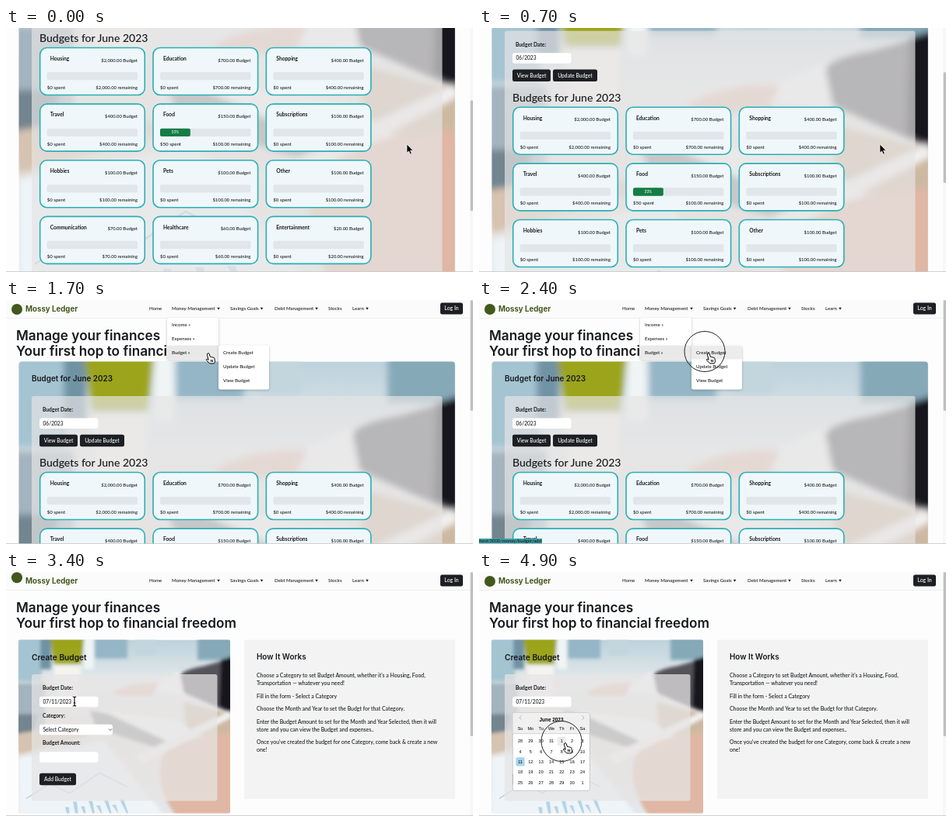
Write an HTML page that moves like this. It is 600 by 315 pixels and loops after 5 s.

```html
<!DOCTYPE html>
<html lang="en">
<head>
<meta charset="utf-8">
<title>Budget planner</title>
<style>
html, body { margin: 0; width: 100%; height: 100%; overflow: hidden; background: #fdfdfd; }
svg { display: block; width: 600px; height: 315px; }
text { font-family: Lato, "Open Sans", sans-serif; font-weight: 500; fill: #16191c; white-space: pre; }
.head { font-family: Inter, sans-serif; font-weight: 600; }
.brand { font-family: Inter, sans-serif; font-weight: 700; fill: #42581c; }
.bold { font-weight: 700; }
.white { fill: #fff; }
.cal { font-family: "Liberation Sans", Arial, sans-serif; font-weight: 400; fill: #000; }
.calb { font-family: "Liberation Sans", Arial, sans-serif; font-weight: 700; fill: #000; }
.calw { font-family: "Liberation Sans", Arial, sans-serif; font-weight: 700; fill: #fff; }
</style>
</head>
<body>
<svg id="stage" viewBox="0 0 600 315"></svg>
<script>
const DARK = '#1c1f23';

// y is the middle of the capitals
const text = (x, y, s, size = 6.1, cls = '', anchor = 'start') =>
  `<text x="${x}" y="${(y + size * 0.35).toFixed(2)}" font-size="${size}" class="${cls}" text-anchor="${anchor}">${s}</text>`;
const rect = (x, y, w, h, fill, r = 0, more = '') =>
  `<rect x="${x}" y="${y}" width="${w}" height="${h}" fill="${fill}" rx="${r}" ${more}/>`;
const path = (d, fill, more = '') => `<path d="${d}" fill="${fill}" ${more}/>`;
const group = (id, body, more = '') => `<g id="${id}" ${more}>${body}</g>`;
const button = (x, y, w, s) =>
  rect(x, y, w, 15.5, DARK, 2.5) + text(x + w / 2, y + 7.8, s, 6.7, 'white', 'middle');
const field = (x, y, w, s) => rect(x, y, w, 13.5, '#fff', 3) + text(x + 4.5, y + 6.9, s, 6.6);

const defs = `<defs>
  <linearGradient id="air" x2="0" y2="1">
    <stop offset="0" stop-color="#bdd2dc"/><stop offset=".25" stop-color="#e6eaeb"/>
    <stop offset=".6" stop-color="#e4dfda"/><stop offset="1" stop-color="#e3e8ec"/>
  </linearGradient>
  <filter id="soft" x="-10%" y="-10%" width="120%" height="120%"><feGaussianBlur stdDeviation="2"/></filter>
  <filter id="shadow" x="-20%" y="-20%" width="140%" height="140%">
    <feDropShadow dx="0" dy="1" stdDeviation="1.5" flood-opacity=".25"/></filter>
  <clipPath id="crop"><rect width="272" height="224" rx="2"/></clipPath>
  <g id="photo" clip-path="url(#crop)">${
    rect(0, 0, 272, 224, 'url(#air)') +
    `<g filter="url(#soft)">` +
    rect(-6, -6, 36, 60, '#a5c4d2') +
    rect(28, -6, 14, 44, '#6f93a4') +
    rect(98, -6, 42, 30, '#94b6c6') +
    rect(150, -6, 26, 26, '#c3d5dd') +
    rect(230, -6, 50, 32, '#86a9b8') +
    rect(84, -6, 13, 44, '#f0f4f5') +
    rect(-6, 56, 40, 62, '#a4b4be') +
    path('M-6 96H26L18 122H-6Z', '#73858f') +
    path('M40-6H85L80 32H46Z', '#9ca41c') +
    path('M45 32H81L77 84H49Z', '#f4f3f0') +
    path('M280 22L238 34Q214 38 207 46L212 68L280 98Z', '#55535a') +
    path('M280 20L260 26L258 86L280 96Z', '#16181b') +
    path('M207 42L180 54L172 66L213 72Z', '#f2f4f7') +
    path('M122 68Q146 54 180 56L172 72Q150 74 126 72Z', '#e2bfb0') +
    path('M212 80L280 98V126L216 122Z', '#cdb9a2') +
    path('M-6 122L70 110L96 122L0 148Z', '#d6c3b0') +
    path('M0 152L110 130L190 230H0Z', '#eef4f8') +
    path('M92 92L205 108L255 140L215 152L100 114Z', '#85888e') +
    path('M104 90L205 104L240 130L206 138Z', '#f5f5f5') +
    path('M280 120Q220 120 186 148Q172 186 204 230H280Z', '#e0b7a4') +
    path('M150 150L272 92L274 100L160 160Z', '#f2f0ef') +
    `</g>` +
    path('M10 205L40 186L66 198L104 172L140 190', 'none', 'stroke="#8db8d4" stroke-width="1.2" opacity=".7"') +
    Array.from({ length: 8 }, (_, i) =>
      path(`M${62 + i * 11} 224l${-2 - i} ${-8 - (i * 7) % 13}h5l${2 + i} 26z`, '#8fc0da', 'opacity=".6"')).join('')
  }</g>
</defs>`;

const nav = [[184, 'Home'], [213, 'Money Management', 273], [288, 'Savings Goals', 328.5],
  [345, 'Debt Management', 399], [414, 'Stocks'], [445, 'Learn', 464]];

const header = rect(0, 0, 600, 23, '#fbfbfb') + rect(0, 23, 600, 0.6, '#e3e3e3') +
  '<circle id="logo" cx="14" cy="12" r="7" fill="#42581c"/>' +
  text(25, 11.5, 'Mossy Ledger', 9.7, 'brand') +
  nav.map(([x, s, c]) => text(x, 11, s) + (c ? path(`M${c - 1.8} 9.8h3.6l-1.8 3z`, DARK) : '')).join('') +
  rect(558, 3.5, 29, 15, DARK, 2.5) + text(572.5, 11, 'Log In', 6.9, 'white', 'middle') +
  text(13, 46, 'Manage your finances', 17.2, 'head') +
  text(13, 65.5, 'Your first hop to financial freedom', 17.2, 'head');

const budgets = [['Housing', 2000], ['Education', 700], ['Shopping', 400], ['Travel', 400],
  ['Food', 150, 50], ['Subscriptions', 100], ['Hobbies', 100], ['Pets', 100], ['Other', 100],
  ['Communication', 70], ['Healthcare', 60], ['Entertainment', 20]];
const money = n => '$' + n.toLocaleString('en-US', { minimumFractionDigits: 2 });

function card([name, total, spent = 0], i) {
  const x = 43.7 + i % 3 * 145.3, y = 222.5 + Math.floor(i / 3) * 72.6;
  const part = spent / total;
  return rect(x, y, 134.6, 61, '#f0f7fa', 9, 'stroke="#29afb7" stroke-width="1.6"') +
    text(x + 13, y + 14, name, 6.7, 'bold') +
    text(x + 125.3, y + 16, money(total) + ' Budget', 5.9, '', 'end') +
    rect(x + 9, y + 31.5, 116.5, 10.3, '#e1e6ea', 2.5) +
    (spent ? rect(x + 9, y + 31.5, 116.5 * part, 10.3, '#147d45', 2) +
      text(x + 9 + 58 * part, y + 36.7, Math.floor(part * 100) + '%', 4.8, 'white', 'middle') : '') +
    text(x + 9, y + 51.5, `$${spent} spent`, 6.1) +
    text(x + 125.3, y + 51.5, money(total - spent) + ' remaining', 5.9, '', 'end');
}

const overview = '<use href="#photo" transform="translate(16.5 79.5) scale(2.06)"/>' +
  text(33, 101.5, 'Budget for June 2023', 9.9, 'head') +
  rect(33, 124, 527.5, 410, '#e6e5e5', 3, 'opacity=".68"') +
  text(47, 141.5, 'Budget Date:', 6.7, 'bold') +
  field(43, 152.5, 75.5, '06/2023') +
  button(43, 173.7, 49, 'View Budget') + button(95, 173.7, 57, 'Update Budget') +
  text(43, 210.5, 'Budgets for June 2023', 14) +
  budgets.map(card).join('');

const help = [[134, "Choose a Category to set Budget Amount, whether it's a Housing, Food,"],
  [144, 'Transportation — whatever you need!'], [160.5, 'Fill in the form - Select a Category'],
  [177, 'Choose the Month and Year to set the Budgt for that Category.'],
  [193.5, 'Enter the Budget Amount to set for the Month and Year Selected, then it will'],
  [203.5, 'store and you can view the Budget and expenses..'],
  [219.5, "Once you've created the budget for one Category, come back &amp; create a new"], [229.5, 'one!']];

const form = '<use href="#photo" transform="translate(16 87.5)"/>' +
  text(33, 110, 'Create Budget', 10.2, 'head') +
  rect(33, 132, 238.5, 163.5, '#e6e5e5', 3, 'opacity=".72"') +
  text(47, 149.5, 'Budget Date:', 6.7, 'bold') + field(43, 160.7, 75.5, '07/11/2023') +
  rect(43, 160.7, 75.5, 13.5, 'none', 3, 'id="focus" stroke="#2a7fd0" stroke-width="1.5"') +
  text(47, 186, 'Category:', 6.7, 'bold') + field(43, 196.7, 94, 'Select Category') +
  path('M132 202.5l2 2l2-2', 'none', `stroke="${DARK}" stroke-width=".7"`) +
  text(47, 221, 'Budget Amount:', 6.7, 'bold') + field(43, 232.3, 75.5, '') +
  button(43, 259.7, 47, 'Add Budget') +
  rect(306, 87.5, 271, 205.5, '#f3f3f3', 2) +
  text(322, 110, 'How It Works', 9.9, 'head') +
  help.map(([y, s]) => text(322, y, s, 6.9)).join('');

// Month grid; first is the day of the month in the top left cell
function month(id, title, first, prevLen, len, rows, pick, pickFill, pickCls, hover) {
  const col = i => 53 + i % 7 * 13.33, row = i => 218.3 + Math.floor(i / 7) * 13.33;
  const lead = prevLen - first + 1;
  const cell = (i, fill) => rect(col(i) - 5.6, row(i) - 5.6, 11.2, 11.2, fill, 1.5);
  let s = rect(43.3, 181.5, 99, 34 + rows * 13.33, '#fff', 2, 'stroke="#aeaeae" stroke-width=".6"') +
    rect(43.6, 181.8, 98.4, 27, '#f0f0f0', 1.7) + rect(43.3, 208.6, 99, 0.5, '#aeaeae') +
    path('M54.5 185.5l-2.5 2.6l2.5 2.6M132.5 185.5l2.5 2.6l-2.5 2.6', 'none', 'stroke="#b8b8b8" stroke-width="1"') +
    text(93, 190.7, title, 6.4, 'calb', 'middle');
  ['Su', 'Mo', 'Tu', 'We', 'Th', 'Fr', 'Sa'].forEach((d, i) => s += text(col(i), 202.5, d, 5.5, 'cal', 'middle'));
  s += `<g id="${id}Hover">${cell(hover, '#ececec')}</g>` + cell(pick, pickFill);
  for (let i = 0; i < rows * 7; i++) {
    const n = i < lead ? first + i : (i - lead) % len + 1;
    s += text(col(i), row(i), n, 5.5, i === pick ? pickCls : 'cal', 'middle');
  }
  return group(id, s);
}

const menu = group('menu',
  rect(207, 23, 66, 53.5, '#fff', 2, 'filter="url(#shadow)"') +
  rect(207, 0, 66, 17.7, '#e9e9e9', 0, 'id="row"') +
  ['Income', 'Expenses', 'Budget'].map((s, i) => text(213, 32 + i * 17.9, s + ' »')).join('') +
  group('sub', rect(273, 58.5, 65, 57, '#fff', 2.5, 'filter="url(#shadow)"') +
    rect(273, 59, 65, 17.5, '#ececec', 2, 'id="subRow"') +
    ['Create', 'Update', 'View'].map((s, i) => text(279, 68 + i * 17.9, s + ' Budget')).join('')));

const cursor = group('cursor',
  path('M0 0V11.2L2.6 8.9L4.4 13L6.3 12.2L4.6 8.2H8Z', '#000', 'id="arrow" stroke="#fff" stroke-width=".7"') +
  path('M0 0c1-.8 2 0 2.3 1l1.2 3.6q1-.6 1.8.3q1-.5 1.7.4q1.4-.4 1.8 1l.6 3q.2 2-1 3.6h-5.6l-4.2-4q-.8-1.3.6-1.6l2 1l-1.7-6q-.4-1.4.5-2.3zM4.3 8l.5 3M6.2 8l.4 3',
    '#fff', 'id="hand" stroke="#000" stroke-width="1"') +
  path('M-2.2-6Q0-6 0-4.5Q0-6 2.2-6M0-4.5V4.5M-2.2 6Q0 6 0 4.5Q0 6 2.2 6M-1.2 2h2.4', 'none',
    'id="beam" stroke="#000" stroke-width="1.1"'));

const status = group('status', rect(0, 308, 81, 7, '#3b9aa2') +
  text(80, 311.3, 'localhost:3000/money/budget/add', 5.9, '', 'end'));

document.getElementById('stage').innerHTML = defs +
  group('page', header + group('overview', overview) + group('form', form)) +
  month('july', 'July 2023', 25, 30, 31, 6, 16, '#216ba5', 'calw', 8) +
  month('june', 'June 2023', 28, 31, 30, 5, 14, '#a9d3ee', 'cal', 4) + menu + status +
  rect(596, 0, 4, 315, '#f7f7f7') + rect(596.7, 0, 3.3, 143, '#bfbfbf', 1.6, 'id="thumb"') +
  rect(0, 314.2, 600, 0.8, '#c9c9c9') +
  '<circle id="ring" r="26" fill="none" stroke="#222" stroke-width="1"/>' + cursor;

const el = id => document.getElementById(id);
const set = (id, k, v) => el(id).setAttribute(k, v);
const show = (id, on) => set(id, 'display', on ? 'inline' : 'none');

// Each key: time in seconds, then values
const scrollKeys = [[0, 197], [0.25, 190], [0.5, 163], [0.7, 121], [0.8, 45], [0.9, -4], [1, -2], [1.25, -2], [1.4, 0], [5, 0]];
const mouseKeys = [[0, 515, 150], [0.8, 515, 150], [1, 319, 65], [1.25, 242, 11], [1.4, 242, 14],
  [1.65, 259, 69], [1.9, 259, 69], [2.1, 294, 69], [3.05, 294, 69], [3.4, 88, 167], [3.6, 88, 167],
  [4, 70, 221], [4.25, 53, 188], [4.5, 53, 188], [4.8, 110, 221], [5, 110, 221]];
const shapes = [[0, 'arrow'], [1.2, 'hand'], [2.5, 'beam'], [3.15, 'arrow'], [3.35, 'beam'], [3.7, 'arrow'], [3.9, 'hand']];
const clicks = [2.35, 3.45, 4.35, 4.85];

// Eases between neighbouring keys
function at(keys, t, ease = p => p) {
  const i = keys.findIndex(k => k[0] > t), a = keys[i - 1], b = keys[i];
  const p = ease((t - a[0]) / (b[0] - a[0]));
  return a.slice(1).map((v, j) => v + (b[j + 1] - v) * p);
}
const smooth = p => p * p * (3 - 2 * p);

function draw(t) {
  const [top] = at(scrollKeys, t), [x, y] = at(mouseKeys, t, smooth);
  const second = t >= 2.5;
  set('page', 'transform', `translate(0 ${-top})`);
  show('overview', !second);
  show('form', second);
  set('thumb', 'y', Math.max(0, top * 0.474));
  set('thumb', 'height', second ? 212 : 143);
  const hop = Math.min(1, Math.max(0, (t - 3.1) / 1.25));
  set('logo', 'cy', 12 - 7 * Math.sin(Math.PI * hop));

  show('menu', t >= 1.25 && !second);
  show('row', y > 23);
  set('row', 'y', 23 + 17.8 * Math.min(2, Math.max(0, Math.floor((y - 23) / 17.8))));
  show('sub', y > 58.5);
  show('subRow', x > 273);
  show('status', t >= 2 && t < 3.1);

  show('focus', t >= 3.5 && t < 4.4);
  show('july', t >= 3.5 && t < 4.45);
  show('june', t >= 4.45);
  show('julyHover', t >= 3.95 && t < 4.1);
  show('juneHover', t >= 4.7);

  const shape = shapes.filter(s => s[0] <= t).pop()[1];
  for (const s of ['arrow', 'hand', 'beam']) show(s, s === shape);
  set('cursor', 'transform', `translate(${x} ${y})`);
  show('ring', clicks.some(c => t >= c && t < c + 0.15));
  set('ring', 'cx', x - 4);
  set('ring', 'cy', y - 2.5);
}

const start = performance.now();
function tick() {
  draw((performance.now() - start) / 1000 % 5);
  requestAnimationFrame(tick);
}
tick();
</script>
</body>
</html>
```
